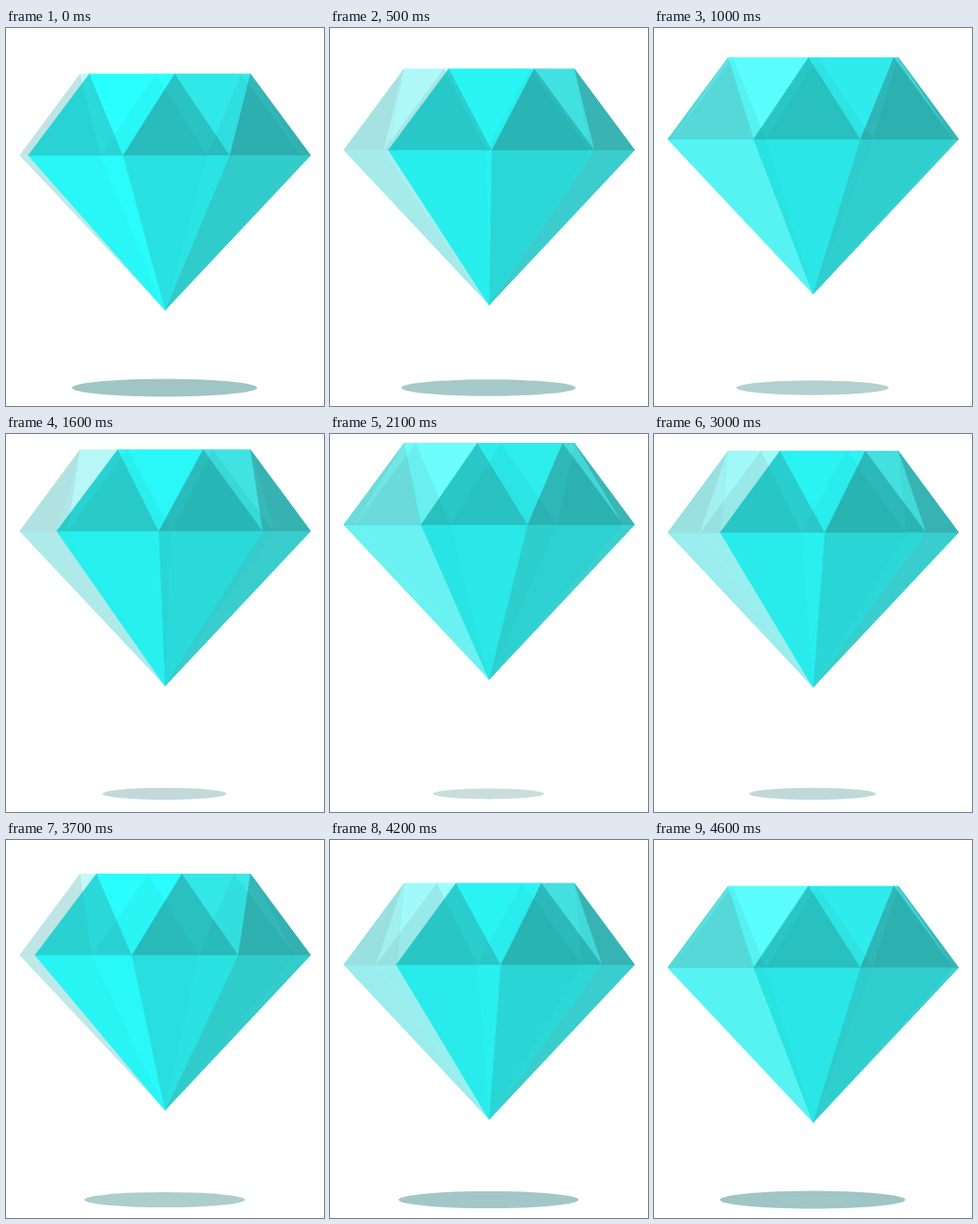
An HTML page with a canvas that plays this animation: 358 px wide and 425 px high, repeating every 4.7 s.

```html
<!DOCTYPE html>
<html lang="en">
<head>
<meta charset="utf-8">
<title>Turning gem</title>
<style>
  html, body { margin: 0; width: 100%; height: 100%; overflow: hidden; background: #fff; }
  canvas { display: block; }
</style>
</head>
<body>
<canvas id="stage" width="358" height="425"></canvas>
<script>
const ctx = document.getElementById('stage').getContext('2d');
const STEP = 100, STEPS = 47, LOOP = STEP * STEPS;
const FACET = 12;                       // steps until a facet takes the next one's place
const MID = 179.2, GIRDLE = 164.2, TABLE = 96;
const CROWN = 91.9, PAVILION = 174.6;

const clamp = (v, lo, hi) => Math.min(hi, Math.max(lo, v));

// The age s of a facet counts steps since its left corner reached the left edge.
function girdleX(s) {
  const u = clamp((s - 16.7) / 18.1, -1, 1);
  return MID + GIRDLE * (1.12 * u - 0.12 * u ** 3);
}

const topX = s => MID + clamp(8 * (s - 10.65), -TABLE, TABLE);

// Facets fade in on the left and thin out a little on the right.
function opacity(s, thinFrom, rate) {
  const fadeIn = clamp(1 + s / FACET, 0, 1) ** 2;
  return fadeIn * (0.95 - rate * Math.max(0, s - thinFrom));
}

// Green and blue sink from the bright left to the dark right.
function shade(s, bright, dark, curve, alpha) {
  const light = (1 - clamp(s / 24, 0, 1)) ** curve;
  const g = Math.round(dark + (bright - dark) * light);
  return `rgba(34,${g},${g},${alpha})`;
}

function facet(s, y) {
  const g0 = girdleX(s), g1 = girdleX(s + FACET);
  const a0 = topX(s), a1 = topX(s + FACET), top = y - CROWN;
  const edge = opacity(s, 18, 0.006);
  return [
    { points: [[g0, y], [g1, y], [MID, y + PAVILION]],
      fill: a => shade(s, 255, 199, 1, edge * a), tint: 0.035 * clamp(s / 24, 0, 1) },
    { points: [[g0, y], [g1, y], [a0, top]],
      fill: a => shade(s, 216, 176, 1.4, edge * a), tint: 0.03 },
    { points: [[a0, top], [a1, top], [g1, y]],
      fill: a => shade(s, 255, 205, 1, opacity(s, 8, 0.012) * a), tint: 0 }
  ];
}

function trace(points) {
  ctx.beginPath();
  for (const [x, y] of points) ctx.lineTo(x, y);
  ctx.closePath();
}

function paint(points, fill) {
  trace(points);
  ctx.fillStyle = fill;
  ctx.fill();
}

const mirror = points => points.map(([x, y]) => [2 * MID - x, y]);

function drawGem(step, y) {
  const top = y - CROWN;
  const parts = [-1, 0, 1, 2].flatMap(k => facet(step % FACET + k * FACET, y));

  ctx.save();
  trace([[MID - TABLE, top], [MID + TABLE, top], [MID + GIRDLE, y],
    [MID, y + PAVILION], [MID - GIRDLE, y]]);
  ctx.clip();
  // The far side turns the other way and shows through the near one.
  for (const p of parts) paint(mirror(p.points), p.fill(0.28));
  for (const p of parts) {
    paint(p.points, p.fill(1));
    ctx.strokeStyle = ctx.fillStyle;
    ctx.stroke();
  }
  for (const p of parts) paint(mirror(p.points), `rgba(0,0,0,${p.tint})`);
  ctx.restore();
}

function drawShadow(lift) {
  const rx = 104.7 - 1.01 * lift;
  const r = Math.round(160 + lift), g = Math.round(197 + 0.58 * lift);
  ctx.fillStyle = `rgb(${r},${g},${g})`;
  ctx.beginPath();
  ctx.ellipse(178.5, 404.5, rx, rx * 0.095, 0, 0, 2 * Math.PI);
  ctx.fill();
}

function draw(step) {
  const bob = 21 * Math.cos(2 * Math.PI * (step * STEP + 85) / LOOP);
  ctx.clearRect(0, 0, 358, 425);
  ctx.lineWidth = 0.4;
  ctx.lineJoin = 'round';
  drawShadow(21.3 - bob);
  drawGem(step, 122.4 + bob);
}

let shown = -1;
const start = performance.now();
function tick() {
  const step = Math.floor((performance.now() - start) / STEP) % STEPS;
  if (step !== shown) draw(shown = step);
  requestAnimationFrame(tick);
}
tick();
</script>
</body>
</html>
```
